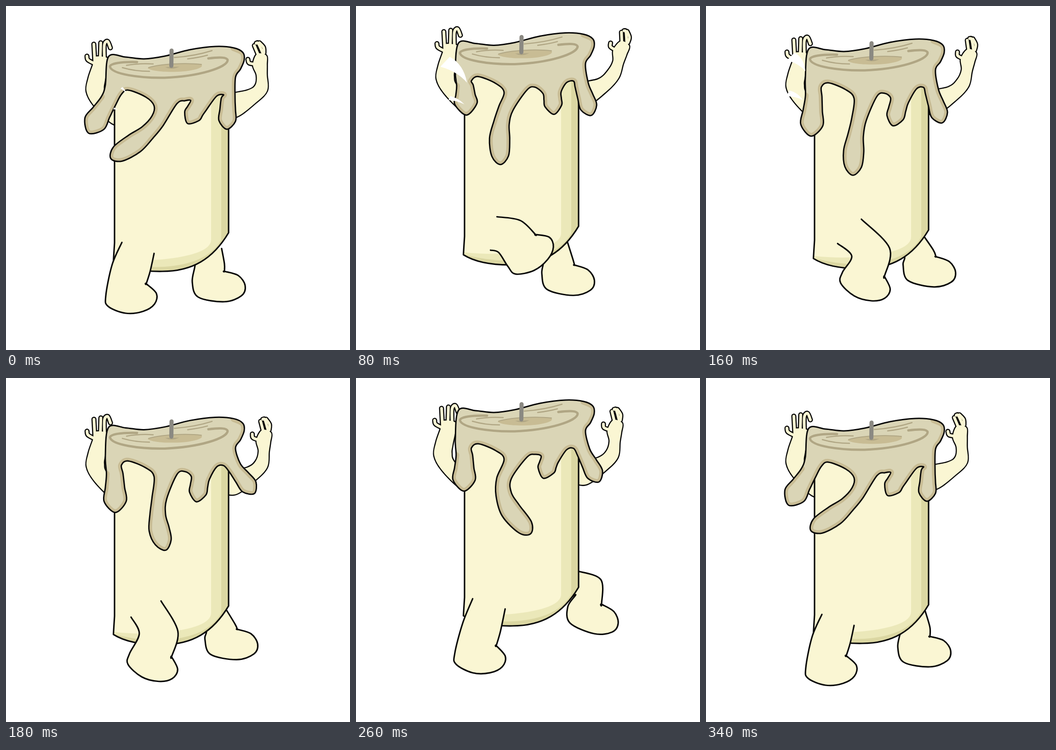
An HTML page with a canvas for the animation above (0.36 s loop, 748 px wide and 748 px high).

```html
<!DOCTYPE html>
<html lang="en">
<head>
<meta charset="utf-8">
<title>Dancing candle</title>
<style>
html, body { margin: 0; height: 100%; overflow: hidden; background: #fff; }
canvas { display: block; }
</style>
</head>
<body>
<canvas id="stage" width="748" height="748"></canvas>
<script>
const ctx = document.getElementById('stage').getContext('2d');
const LOOP = 360, STEP = 20;
const TIMES = [0, 40, 120, 160, 220, 260, 340];
const CREAM = '#faf6d3', PALE = '#ebe8b9', OLIVE = '#dbd7a2';
const WAX = '#dad5b6', TAN = '#c8bc94', BROWN = '#b0a684', INK = '#080808';

const points = s => s.split(' ').map(p => p.split(',').map(Number));
// Poses in time order; missing ones repeat the first.
const poses = (...rows) => TIMES.map((_, i) => (rows[i] || rows[0]).split(' ').map(Number));

// Vertical shift of the wax and of the candle's foot.
const bodyShift = poses('0 0', '-4 -4', '-49 -21', '-16 -6', '11 11', '-40 -38');
// Left arm: x, y. Right arm: x, y, turn of the forearm in degrees.
const leftArmShift = poses('0 0', '0 -12', '0 -36', '0 -9', '0 28', '-5 -17');
const rightArmMove = poses('0 0 0', '1 -11 9', '2 -32 28', '2 -7 15', '-5 39 -2', '1 -10 9');

// Hip, knee, front of the ankle, foot tilt in degrees.
const backLeg = poses(
  '440 530 443 562 475 577 0', '435 537 442 570 474 586 -6', '432 505 441 535 480 540 12',
  '445 510 463 538 500 545 4', '462 510 474 540 508 541 0', '475 448 505 455 534 492 14',
  '448 512 455 545 487 562 0');
const frontLeg = poses(
  '287 526 272 570 305 604 0', '288 501 303 552 350 572 -11', '311 492 359 465 418 450 -42',
  '312 490 358 535 388 588 22', '287 526 272 570 305 604 0', '289 491 273 542 305 582 6');
const backFoot = points('-70,23 -57,56 0,66 37,53 45,31 30,9 0,0 0,0');
const frontFoot = points('-88,26 -83,49 -45,64 -7,60 18,44 22,21 0,0 0,0');

// Centre of each drip's bulb, relative to the wax; the long drip also has a bend.
const rightBulb = poses('481 250', '522 247', '487 254', '508 253', '565 214', '520 250');
const middleBulb = poses('404 240', '434 249', '418 246', '411 259', '430 239', '413 241');
const longBulb = poses('328 274 243 322', '303 286 350 371', '312 260 268 338',
  '319 294 320 366', '303 305 376 341', '283 285 368 365');
const leftBulb = poses('192 256', '232 260', '238 232', '230 275', '254 251', '235 262');

// Crescent-shaped glints: both ends and thickness.
const upperGlint = poses('251 178 261 189 5', '224 147 252 177 15', '170 102 230 156 40', '184 110 216 142 24');
const lowerGlint = poses('234 223 243 226 4', '204 215 239 219 12', '203 187 230 209 7', '178 190 211 205 14');

const rim = points('223,110 260,111 300,115 345,109 400,95 455,88 495,91 515,101 518,117 510,137 499,155');
const leftArm = points('207,112 205,130 197,160 194,183 205,208 240,245');
const leftFingers = ['190,124 178,117 176,109', '193,120 191,83', '205,112 206,80', '214,115 214,84 221,77 227,91'].map(points);
const rightArm = points('556,106 552,128 556,150 555,178 534,197 488,219');
const rightFingers = ['544,127 529,124 526,116', '551,112 540,86', '559,104 549,82 544,81', '561,102 560,90 551,80'].map(points);

// Smooth cyclic interpolation through the poses.
function at(t, list) {
  const n = TIMES.length;
  const time = k => TIMES[(k + n) % n] + LOOP * Math.floor(k / n);
  const pose = k => list[(k + n) % n];
  const i = TIMES.filter(v => v <= t).length - 1;
  const span = time(i + 1) - time(i), u = (t - time(i)) / span;
  return pose(i).map((a, j) => {
    const b = pose(i + 1)[j];
    const slopeA = (b - pose(i - 1)[j]) / (time(i + 1) - time(i - 1));
    const slopeB = (pose(i + 2)[j] - a) / (time(i + 2) - time(i));
    return a + (b - a) * u * u * (3 - 2 * u) + span * u * (1 - u) * (slopeA * (1 - u) - slopeB * u);
  });
}

const radians = degrees => degrees * Math.PI / 180;
const shifted = (pts, dx, dy) => pts.map(([x, y]) => [x + dx, y + dy]);
const turned = (pts, angle, [ox, oy] = [0, 0]) => pts.map(([x, y]) => {
  const c = Math.cos(angle), s = Math.sin(angle);
  return [ox + (x - ox) * c - (y - oy) * s, oy + (x - ox) * s + (y - oy) * c];
});

// Smooth path through the points.
function curve(pts, closed) {
  const n = pts.length, path = new Path2D();
  const p = k => closed ? pts[(k + n) % n] : pts[Math.max(0, Math.min(n - 1, k))];
  path.moveTo(...pts[0]);
  for (let k = 0; k < (closed ? n : n - 1); k++) {
    const [a, b, c, d] = [p(k - 1), p(k), p(k + 1), p(k + 2)];
    path.bezierCurveTo(b[0] + (c[0] - a[0]) / 6, b[1] + (c[1] - a[1]) / 6,
      c[0] - (d[0] - b[0]) / 6, c[1] - (d[1] - b[1]) / 6, ...c);
  }
  if (closed) path.closePath();
  return path;
}

// Outline around a spine with a half width at each point and a round end.
function ribbon(spine, widths) {
  const right = [], left = [], last = spine.length - 1;
  let tip;
  spine.forEach(([x, y], i) => {
    const a = spine[Math.max(0, i - 1)], b = spine[Math.min(last, i + 1)];
    const w = widths[i] / Math.hypot(b[0] - a[0], b[1] - a[1]);
    const dx = (b[0] - a[0]) * w, dy = (b[1] - a[1]) * w;
    right.push([x + dy, y - dx]);
    left.unshift([x - dy, y + dx]);
    tip = [x + dx, y + dy];
  });
  return [...right, tip, ...left];
}

function drip(root, widths, pose) {
  const bulb = pose.slice(-2);
  const bend = pose.length > 2 ? pose : root.map((v, i) => (v + bulb[i]) / 2);
  const spine = widths.map((_, k) => {
    const u = 0.3 + 0.7 * k / (widths.length - 1), v = 1 - u;
    return root.map((r, i) => v * v * r + 2 * u * v * bend[i] + u * u * bulb[i]);
  });
  return ribbon(spine, widths);
}

function leg([hipX, hipY, kneeX, kneeY, ankleX, ankleY, tilt], hipWidth, kneeWidth, foot) {
  const hipAngle = Math.atan2(hipX - kneeX, kneeY - hipY), footAngle = radians(tilt);
  const across = (x, y, angle, w) => [x + w * Math.cos(angle), y + w * Math.sin(angle)];
  const hip = w => across(hipX, hipY, hipAngle, w);
  const knee = w => across(kneeX, kneeY, (hipAngle + footAngle) / 2, w);
  return curve([hip(-hipWidth), knee(-kneeWidth), ...shifted(turned(foot, footAngle), ankleX, ankleY),
    knee(kneeWidth), hip(hipWidth)]);
}

function paint(path, fill, stroke, width) {
  if (fill) { ctx.fillStyle = fill; ctx.fill(path); }
  if (stroke) { ctx.strokeStyle = stroke; ctx.lineWidth = width; ctx.stroke(path); }
}
const shape = (d, fill, stroke, width) => paint(new Path2D(d), fill, stroke, width);

function drawArm(spine, widths, fingers) {
  const arm = curve(ribbon(spine, widths), true), lines = fingers.map(f => curve(f));
  paint(arm, null, INK, 5);
  lines.forEach(line => paint(line, null, INK, 11));
  paint(arm, CREAM);
  lines.forEach(line => paint(line, null, CREAM, 6));
}

function drawArms(t) {
  const [dx, dy, degrees] = at(t, rightArmMove), elbow = [570, 183];
  const swing = pts => shifted(turned(pts, radians(degrees), elbow), dx, dy);
  drawArm([...swing(rightArm.slice(0, 4)), ...shifted(rightArm.slice(4), dx, dy)],
    [10, 15, 11, 14, 16, 25], rightFingers.map(swing));

  const move = at(t, leftArmShift);
  drawArm(shifted(leftArm, ...move), [14, 16, 18, 19, 16, 14], leftFingers.map(f => shifted(f, ...move)));
}

function drawBody(top, base) {
  const y = v => v + base, start = 165 + top;
  const outline = new Path2D(`M236 ${start}V${y(515)}L233.500 ${y(555)}Q270 ${y(578)} 340 ${y(577)}C405 ${y(577)} 450 ${y(550)} 484 ${y(493)}V${start}`);
  ctx.save();
  ctx.clip(outline);
  paint(outline, OLIVE);
  shape(`M230 ${start}V${y(553)}Q290 ${y(570)} 345 ${y(567)}Q440 ${y(560)} 468 ${y(508)}V${start}`, PALE);
  shape(`M230 ${start}V${y(549)}Q290 ${y(556)} 340 ${y(551)}Q446 ${y(540)} 446 ${y(508)}V${start}`, CREAM);
  ctx.restore();
  paint(outline, null, INK, 3.2);
}

function drawWax(t, top) {
  const edge = shifted(rim, 0, top);
  const drips = shifted([
    ...drip([484, 180], [15, 17, 18], at(t, rightBulb)),
    [473, 193], [458, 196],
    ...drip([425, 205], [20, 19, 18], at(t, middleBulb)),
    [389, 206], [372, 212],
    ...drip([347, 215], [16, 17, 22, 18], at(t, longBulb)),
    [322, 217], [304, 198], [266, 183], [251, 192],
    ...drip([236, 185], [18, 21, 24], at(t, leftBulb)),
    [216, 172]], 0, top);
  const outline = curve([...edge, ...drips], true);
  paint(outline, WAX);
  ctx.save();
  ctx.clip(outline);
  paint(curve([...edge.slice(6), ...drips.slice(0, -1)]), null, TAN, 14);
  ctx.translate(0, top);
  shape('M285 122C250 121 226 125 226 132C230 148 290 157 345 156C420 153 480 134 482 118C481 111 464 111 440 114', null, BROWN, 5);
  shape('M253 134Q280 142 312 142M262 129Q290 124 320 126M366 112Q410 109 448 97M395 115Q420 112 438 107', null, BROWN, 2.5);
  shape('M308 135C330 126 390 122 424 127C434 133 408 142 372 143C340 144 315 141 308 135Z', TAN);
  shape('M310 134C335 126 390 123 425 127', null, BROWN, 2);
  shape('M346 133Q360 140 377 132', BROWN);
  ctx.restore();
  paint(outline, null, INK, 3);
  shape(`M360 ${97 + top}L359.500 ${130 + top}`, null, '#8b8982', 9);
}

function drawGlint([ax, ay, bx, by, thickness]) {
  const length = Math.hypot(bx - ax, by - ay);
  const nx = (by - ay) / length * thickness, ny = (ax - bx) / length * thickness;
  const along = (x, y, k) => `${x + nx * k} ${y + ny * k}`;
  const mx = (ax + bx) / 2, my = (ay + by) / 2;
  shape(`M${along(ax, ay, 0.5)}Q${along(mx, my, 0.8)} ${bx} ${by}Q${along(mx, my, 0.1)} ${along(ax, ay, -0.5)}Z`, '#fff');
}

function draw(t) {
  ctx.fillStyle = '#fff';
  ctx.fillRect(0, 0, 748, 748);
  ctx.lineCap = ctx.lineJoin = 'round';
  const [top, base] = at(t, bodyShift);
  paint(leg(at(t, backLeg), 29, 32, backFoot), CREAM, INK, 3.2);
  drawArms(t);
  drawBody(top, base);
  paint(leg(at(t, frontLeg), 37, 42, frontFoot), CREAM, INK, 3.2);
  drawWax(t, top);
  if (t < 180) [upperGlint, lowerGlint].forEach(glint => drawGlint(at(t, glint)));
}

function tick() {
  draw(Math.floor(performance.now() % LOOP / STEP) * STEP);
  requestAnimationFrame(tick);
}
tick();
</script>
</body>
</html>
```
